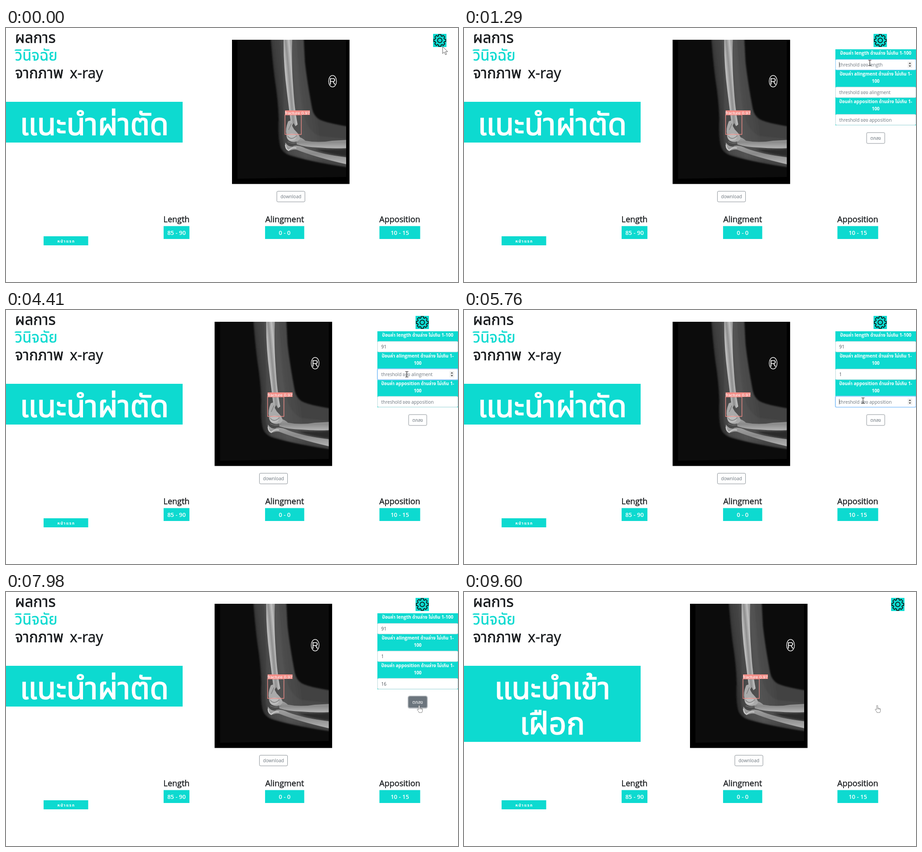
Write an HTML page that moves like this. It is 998 by 561 pixels and loops after 9.66 s.

```html
<!DOCTYPE html>
<html lang="th">
<head>
<meta charset="utf-8">
<title>X-ray result</title>
<style>
  html, body { margin: 0; width: 100%; height: 100%; overflow: hidden; background: #fff; }
  svg { display: block; width: 100%; height: 100%; }
  text { font-family: "Open Sans", "Noto Sans", "Noto Sans Thai", sans-serif; }
  .teal { fill: #0ddad0; }
  .mid { text-anchor: middle; }
  .title { font-size: 33px; fill: #16191c; stroke: #16191c; stroke-width: .5; }
  .title.accent { fill: #0ddad0; stroke: #0ddad0; }
  .title.latin { font-size: 32px; }
  .advice { font-size: 68px; fill: #fff; stroke: #fff; stroke-width: 1.6; }
  .head { font-size: 18px; fill: #16191c; stroke: #16191c; stroke-width: .4; }
  .value { font-size: 13px; font-weight: 600; fill: #fff; }
  .home { font-size: 8.500px; font-weight: 700; letter-spacing: 1.6px; fill: #fff; }
  .small { font-size: 10px; fill: #6c757d; }
  .typed { font-size: 10px; fill: #495057; }
  .label { font-size: 10px; font-weight: 700; fill: #fff; }
  .button { fill: #fff; stroke: #6c757d; stroke-width: .8; }
  .mark { font-family: "Liberation Sans", sans-serif; fill: #fff; }
</style>
</head>
<body>
<svg viewBox="0 0 998 561">
  <defs>
    <linearGradient id="tissue" gradientUnits="userSpaceOnUse" x1="584" y1="150" x2="684" y2="138">
      <stop offset="0" stop-color="#262626"/>
      <stop offset=".25" stop-color="#404040"/>
      <stop offset=".6" stop-color="#505050"/>
      <stop offset="1" stop-color="#424242"/>
    </linearGradient>
    <linearGradient id="shaft" gradientUnits="userSpaceOnUse" x1="614" y1="102" x2="635" y2="100">
      <stop offset="0" stop-color="#a6a6a6"/>
      <stop offset=".2" stop-color="#bdbdbd"/>
      <stop offset=".5" stop-color="#8e8e8e"/>
      <stop offset=".82" stop-color="#c0c0c0"/>
      <stop offset="1" stop-color="#a0a0a0"/>
    </linearGradient>
    <linearGradient id="fore" x1="0" y1="0" x2="0" y2="1">
      <stop offset="0" stop-color="#a8a8a8"/>
      <stop offset=".5" stop-color="#8a8a8a"/>
      <stop offset="1" stop-color="#b4b4b4"/>
    </linearGradient>
    <filter id="soft"><feGaussianBlur stdDeviation="1.8"/></filter>
    <filter id="fine"><feGaussianBlur stdDeviation=".6"/></filter>
    <clipPath id="plate"><path d="M499 26H751V344H499Z"/></clipPath>
  </defs>

  <rect width="998" height="561" fill="#fff"/>
  <text class="title" x="20" y="33">ผลการ</text>
  <text class="title accent" x="20" y="72">วินิจฉัย</text>
  <text class="title" x="20" y="111">จากภาพ</text>
  <text class="title latin" x="141" y="111">x-ray</text>

  <rect id="banner" class="teal" y="163" width="390" height="90"/>
  <text id="line1" class="advice mid" x="195" y="236"></text>
  <text id="line2" class="advice mid" x="195" y="314"></text>

  <g id="photo">
    <rect x="499" y="26" width="259.500" height="318.500"/>
    <path d="M511 26H751V329L511 333Z" fill="#0c0c0c"/>
    <g clip-path="url(#plate)">
      <path filter="url(#soft)" fill="url(#tissue)" d="M584 16Q588 70 593 110Q601 160 602 200Q600 245 606 263Q612 278 632 283Q690 299 765 309V219Q710 211 692 202Q679 194 676 178Q665 120 660 75L657 16Z"/>
      <path filter="url(#soft)" fill="#606060" opacity=".25" d="M607 20H642Q645 110 655 180Q662 225 690 238L760 246V304Q690 290 625 278Q607 260 612 205Q614 100 607 20Z"/>
      <path filter="url(#soft)" fill="#2c2c2c" d="M682 268Q720 270 758 267V284Q720 281 682 268Z"/>
      <g filter="url(#fine)">
        <path fill="url(#fore)" d="M640 238Q654 242 661 249Q690 254 720 249L756 247V265Q720 267 690 264Q660 263 642 257Z"/>
        <path fill="url(#fore)" d="M617 253Q614 268 624 272Q634 267 642 269Q685 286 756 302V286Q700 280 662 266Q642 256 632 262Q622 262 617 253Z"/>
        <path fill="url(#shaft)" d="M613 20H632Q630 80 634 130Q637 180 644 213L639 217L635 210L630 218Q625 180 620 140Q612 80 613 20Z"/>
        <path fill="#aaa" d="M623 206L629 204Q631 220 640 228Q650 238 649 245Q642 254 630 251Q619 248 619 235Q616 224 623 206Z"/>
        <ellipse cx="631" cy="241" rx="10" ry="8" fill="#bcbcbc"/>
        <path d="M622 239Q630 249 642 238M624 225L630 211M622 251Q632 257 646 252" fill="none" stroke="#777" stroke-width="1.300"/>
        <path d="M617 258Q618 268 624 270Q632 263 641 265" fill="none" stroke="#d0d0d0" stroke-width="2"/>
      </g>
    </g>
    <ellipse cx="721" cy="117.500" rx="8.700" ry="12.700" fill="none" stroke="#eee" stroke-width="1.400"/>
    <text class="mark mid" x="721" y="125" font-size="20">R</text>
    <path d="M616 182H671V192H616Z" fill="#f38e88"/>
    <rect x="616" y="192" width="36" height="43" fill="none" stroke="#f38e88" stroke-width="1.300"/>
    <text class="mark" x="616" y="190.500" font-size="9.800">fracture 0.97</text>
    <rect class="button" x="598" y="360.500" width="62" height="23.500" rx="2.500"/>
    <text class="small mid" x="629" y="376">download</text>
  </g>

  <g id="scores"></g>
  <rect class="teal" x="83" y="460" width="98.500" height="20"/>
  <text class="home mid" x="133" y="473.500">หน้าแรก</text>

  <g id="gear">
    <rect class="teal" x="943" y="13" width="29.500" height="29"/>
    <path id="cog" transform="translate(957.8 27.4)" fill="none" stroke="#101414" stroke-width="1.700" stroke-linejoin="round"/>
    <circle cx="957.800" cy="27.400" r="5" fill="none" stroke="#101414" stroke-width="1.700"/>
  </g>

  <g id="panel">
    <rect class="teal" x="820" y="47" width="178" height="168"/>
    <g id="fields"></g>
    <rect id="halo" x="888" y="230" width="42" height="26.500" rx="3.500" fill="none" stroke="#b5babe" stroke-width="2.200"/>
    <rect class="button" x="889" y="231" width="40" height="24" rx="2.500"/>
    <rect id="press" x="889" y="231" width="40" height="24" rx="2.500" fill="#6c757d"/>
    <text id="ok" class="small mid" x="909" y="247">ตกลง</text>
  </g>

  <g id="cursor">
    <path id="arrow" d="M0 0V15.500L3.700 12L6.300 18L8.800 17L6.300 11.200H11.200Z" fill="#fff" stroke="#333" stroke-width=".8"/>
    <path id="beam" d="M-3.500 -6H-.8L0 -5.400L.8 -6H3.500M0 -5.400V5.400M-3.500 6H-.8L0 5.400L.8 6H3.500" fill="none" stroke="#222" stroke-width="1.100"/>
    <path id="hand" d="M-1.500 9V.8Q-1.500 -.6 -.2 -.6T1.100 .8V5.500Q2.400 4.500 3.200 6Q4.400 5.200 5.200 6.600Q7 6 7 8V11Q7 13 5.700 15.300H-.6Q-1 13.300 -3.900 10Q-5 8.300 -4 7.800T-1.500 9ZM1.100 5.500V8M3.200 6V8.300M5.200 6.600V8.600" fill="#fff" stroke="#555" stroke-width=".7"/>
  </g>
</svg>
<script>
const LOOP = 9660, OPEN = 240, RELOAD = 8700, BLINK = 480;
const $ = id => document.getElementById(id);
const show = (el, on) => el.setAttribute('display', on ? 'inline' : 'none');
const clamp = v => Math.max(0, Math.min(1, v));

function add(parent, tag, attrs, text = '') {
  const el = document.createElementNS('http://www.w3.org/2000/svg', tag);
  for (const k in attrs) el.setAttribute(k, attrs[k]);
  el.textContent = text;
  return parent.appendChild(el);
}

// Score boxes: heading, value, left edge, width
[['Length', '85 - 90', 348, 57], ['Alingment', '0 - 0', 572, 86.5], ['Apposition', '10 - 15', 824.5, 90]]
  .forEach(([head, value, x, w]) => {
    const g = $('scores'), mid = x + w / 2;
    add(g, 'text', { class: 'head mid', x: mid, y: 428.5 }, head);
    add(g, 'rect', { class: 'teal', x, y: 437.5, width: w, height: 28.5 });
    add(g, 'text', { class: 'value mid', x: mid, y: 457 }, value);
  });

// Eight-toothed cog
const cog = [];
for (let i = 0; i < 8; i++) {
  for (const [r, a] of [[10.4, -.27], [13.4, -.2], [13.4, .2], [10.4, .27]]) {
    const t = i * Math.PI / 4 + a;
    cog.push((r * Math.cos(t)).toFixed(2) + ' ' + (r * Math.sin(t)).toFixed(2));
  }
}
$('cog').setAttribute('d', 'M' + cog.join('L') + 'Z');

// keys: moments at which each character is typed
const fields = [
  { name: 'length', top: 47, y: 69, focus: 1290, blur: 3930, text: '91', keys: [2730, 2880] },
  { name: 'alingment', top: 93, y: 130, focus: 3930, blur: 5580, text: '1', keys: [4590] },
  { name: 'apposition', top: 154, y: 190.5, focus: 5580, blur: 7650, text: '16', keys: [5970, 6360] }
];

fields.forEach((f, i) => {
  const g = $('fields'), prompt = `ป้อนค่า ${f.name} ด้านล่าง ไม่เกิน 1-`;
  add(g, 'text', { class: 'label mid', x: 909, y: f.top + 12 }, i ? prompt : prompt + '100');
  if (i) add(g, 'text', { class: 'label mid', x: 909, y: f.top + 27.5 }, '100');
  f.ring = add(g, 'rect', { x: 819, y: f.y - 1, width: 180, height: 26, rx: 3.5, fill: '#9bcdf5' });
  f.box = add(g, 'rect', { x: 820.4, y: f.y + .3, width: 177.2, height: 23.5, rx: 2.5, fill: '#fff', 'stroke-width': .8 });
  f.hint = add(g, 'text', { class: 'small', x: 828.5, y: f.y + 16 }, `threshold ของ ${f.name}`);
  f.typed = add(g, 'text', { class: 'typed', x: 828.5, y: f.y + 16 });
  f.caret = add(g, 'rect', { y: f.y + 6, width: .8, height: 12, fill: '#333' });
  f.spin = add(g, 'g', { transform: `translate(984.5 ${f.y + 12})` });
  add(f.spin, 'rect', { x: -5, y: -7, width: 10, height: 14, fill: '#efefef' });
  add(f.spin, 'path', { d: 'M-2.6 -1.8L0 -4.8L2.6 -1.8ZM-2.6 1.8L0 4.8L2.6 1.8Z', fill: '#444' });
});

const path = [
  [0, 964, 41], [60, 963.5, 39], [240, 963.5, 39], [900, 896, 77], [2730, 896, 77],
  [3180, 888, 94], [3360, 888, 94], [3510, 884, 108], [3630, 884, 114], [3780, 884, 114],
  [4200, 885, 142], [5070, 885, 142], [5700, 881, 200], [6840, 881, 200], [7500, 912.5, 251]
];

function pointer(t) {
  const i = path.findIndex(p => p[0] > t);
  if (i < 0) return path[path.length - 1].slice(1);
  const [t0, x0, y0] = path[i - 1], [t1, x1, y1] = path[i];
  const u = (t - t0) / (t1 - t0), e = u * u * (3 - 2 * u);
  return [x0 + (x1 - x0) * e, y0 + (y1 - y0) * e];
}

function drawField(f, t, x, y) {
  const n = f.keys.filter(k => k <= t).length;
  const active = t >= f.focus && t < f.blur;
  const glow = active ? clamp((t - f.focus) / 150) : 1 - clamp((t - f.blur) / 150);
  const since = n ? f.keys[n - 1] : f.focus;
  f.ring.setAttribute('opacity', t < f.focus ? 0 : glow);
  f.box.setAttribute('stroke', active ? '#80bdff' : '#ced4da');
  f.typed.textContent = f.text.slice(0, n);
  show(f.hint, !n);
  f.caret.setAttribute('x', 828.3 + n * 5.8);
  show(f.caret, active && (t - since) % (2 * BLINK) < BLINK);
  show(f.spin, active || (x > 820 && y >= f.top && y < f.y + 24));
}

function draw(t) {
  const open = t >= OPEN && t < RELOAD, done = t >= RELOAD;
  const [x, y] = pointer(t);

  $('banner').setAttribute('height', done ? 168 : 90);
  $('line1').textContent = done ? 'แนะนำเข้า' : 'แนะนำผ่าตัด';
  $('line2').textContent = done ? 'เฝือก' : '';
  $('photo').setAttribute('transform', `translate(${open ? -38.4 : 0} 0)`);
  $('gear').setAttribute('transform', `translate(${open ? -38.7 : 0} 0)`);
  show($('panel'), open);
  fields.forEach(f => drawField(f, t, x, y));

  const hover = clamp((t - 7260) / 150);
  $('press').setAttribute('opacity', hover);
  $('ok').style.fill = hover > .5 ? '#fff' : '#6c757d';
  $('halo').setAttribute('opacity', clamp((t - 7650) / 150));

  const hand = y > 231;
  const beam = open && fields.some(f => y > f.y && y < f.y + 24);
  show($('hand'), hand);
  show($('beam'), beam);
  show($('arrow'), !hand && !beam);
  $('cursor').setAttribute('transform', `translate(${x.toFixed(2)} ${y.toFixed(2)})`);
}

const start = performance.now();
function tick() {
  draw((performance.now() - start) % LOOP);
  requestAnimationFrame(tick);
}
tick();
</script>
</body>
</html>
```
